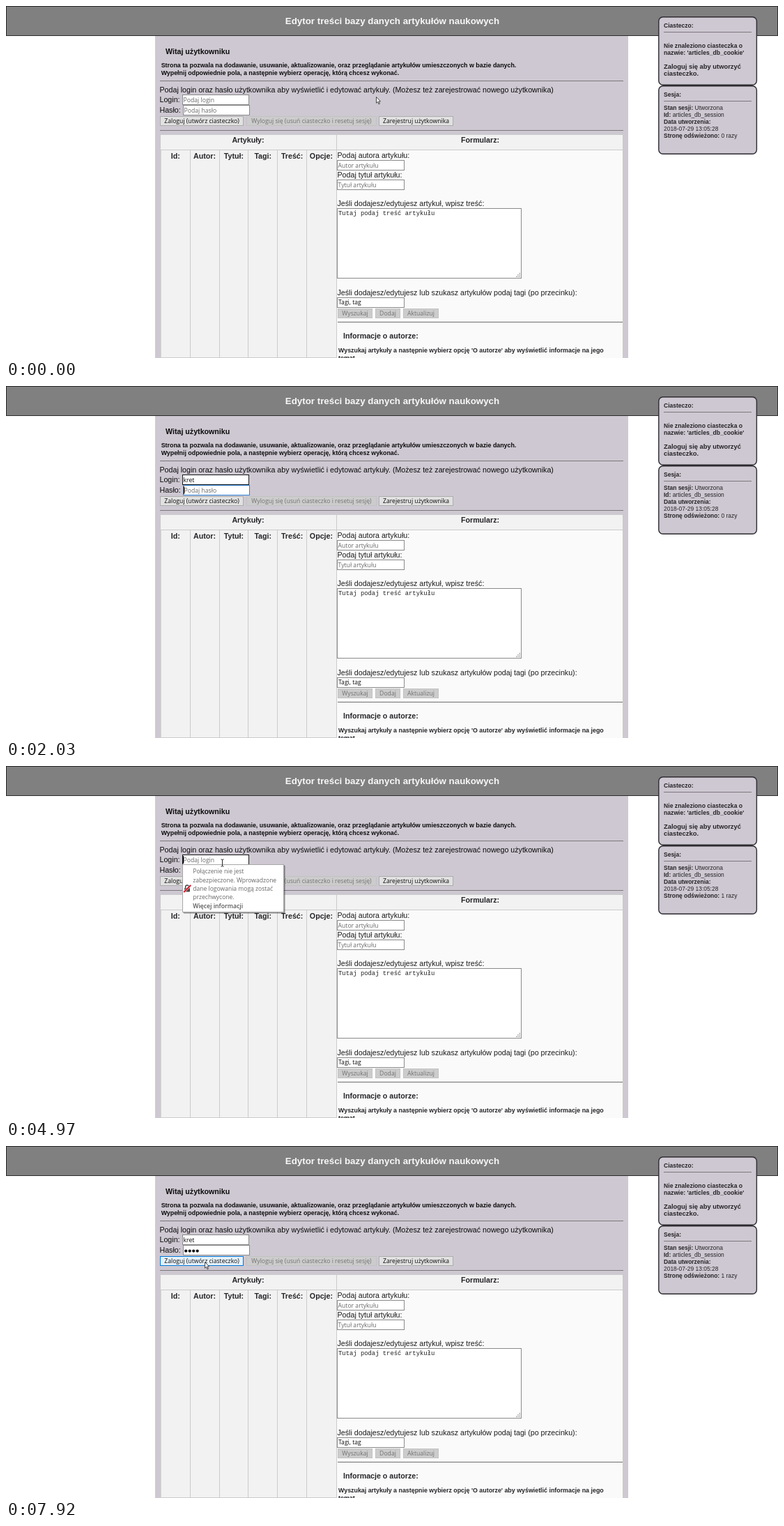
Animation of 1108x505 px, one loop 8 s. Source, as an HTML page:

```html
<!DOCTYPE html>
<html lang="pl">
<head>
<meta charset="utf-8">
<title>Edytor treści</title>
<style>
html, body { margin: 0; width: 100%; height: 100%; overflow: hidden; background: #fff; }
svg { display: block; width: 1108px; height: 505px; }
text { font-family: "Liberation Sans", Arial, sans-serif; white-space: pre; }
.ui { font-family: "Open Sans", "Noto Sans", sans-serif; font-size: 8.65px; }
.mono { font-family: "Liberation Mono", monospace; font-size: 8.87px; }
.b { font-weight: 700; }
</style>
</head>
<body>
<svg id="stage" viewBox="0 0 1108 505"></svg>
<script>
const stage = document.getElementById('stage');
const LILAC = '#cec8d2', INK = '#0c0c0c', SOFT = '#262428', HINT = '#676767', EDGE = '#8a8a8a';
const LOOP = 8000, WORD = 'kret';

function add(tag, attrs, parent = stage) {
  const el = document.createElementNS('http://www.w3.org/2000/svg', tag);
  set(el, attrs);
  parent.appendChild(el);
  return el;
}
function set(el, attrs) {
  for (const k in attrs) el.setAttribute(k, attrs[k]);
}
const show = (el, on) => set(el, { visibility: on ? 'visible' : 'hidden' });

// Filled box with a one-pixel border inside its edges
function box(x, y, w, h, fill, stroke, parent) {
  return add('rect', { x: x + .5, y: y + .5, width: w - 1, height: h - 1, fill, stroke: stroke || fill }, parent);
}
function line(x1, y1, x2, y2, stroke) {
  add('path', { d: `M${x1} ${y1}L${x2} ${y2}`, stroke });
}
function text(str, x, y, opt = {}, parent) {
  const { size = 10.67, fill = INK, cls = '', anchor = 'start' } = opt;
  const el = add('text', { x, y, fill, class: cls, 'text-anchor': anchor, 'font-size': size }, parent);
  el.textContent = str;
  return el;
}
const bold = (str, x, y, size = 10.67, fill = INK, anchor) => text(str, x, y, { size, fill, cls: 'b', anchor });
const ui = (str, x, y, fill = INK, parent) => text(str, x, y, { fill, cls: 'ui' }, parent);

function button(label, x, y, w, h, on) {
  const face = on ? box(x, y, w, h, '#e1e1e1', '#adadad') : box(x, y, w, h, '#cccccc', '#c3c3c3');
  text(label, x + w / 2, y + h / 2 + 3.2, { cls: 'ui', anchor: 'middle', fill: on ? INK : '#727272' });
  return face;
}
function field(x, y, w, h, hint) {
  const frame = box(x, y, w, h, '#fff', EDGE);
  return { frame, hint: ui(hint, x + 1.6, y + h / 2 + 3.1, HINT) };
}

// Page frame
box(0, 0, 1108, 43, '#808080', '#2a2a2a');
bold('Edytor treści bazy danych artykułów naukowych', 554.5, 26, 13.33, '#f7f7f7', 'middle');
add('rect', { x: 214, y: 43, width: 679, height: 462, fill: LILAC });
bold('Witaj użytkowniku', 229, 69);
bold('Strona ta pozwala na dodawanie, usuwanie, aktualizowanie, oraz przeglądanie artykułów umieszczonych w bazie danych.', 222.7, 88, 8.85);
bold('Wypełnij odpowiednie pola, a następnie wybierz operację, którą chcesz wykonać.', 222.7, 99, 8.85);
line(221, 107.5, 886, 107.5, '#7b787d');
text('Podaj login oraz hasło użytkownika aby wyświetlić i edytować artykuły. (Możesz też zarejestrować nowego użytkownika)', 220.5, 124);
text('Login:', 220.5, 138);
text('Hasło:', 220.5, 153);

// Table
line(221, 178.5, 886, 178.5, '#7b787d');
box(221, 184, 254, 321, '#f2f2f2', '#cbcbcb');
box(474, 184, 412, 23, '#f2f2f2', '#cbcbcb');
box(474, 206, 412, 300, '#fafafa', '#cbcbcb');
line(221, 206.5, 475, 206.5, '#cbcbcb');
bold('Artykuły:', 347.5, 196, 10.67, SOFT, 'middle');
bold('Formularz:', 680.5, 196, 10.67, SOFT, 'middle');
['Id:', 'Autor:', 'Tytuł:', 'Tagi:', 'Treść:', 'Opcje:'].forEach((name, i) => {
  bold(name, 243.2 + i * 41.85, 219, 10.67, SOFT, 'middle');
  const x = Math.round(264 + i * 41.7) + .5;
  if (i < 5) line(x, 207, x, 505, '#cbcbcb');
});
line(222.5, 207, 222.5, 505, '#d6d6d6');

// Form
const label = (str, y) => text(str, 475.5, y, { fill: '#1c1c1c' });
label('Podaj autora artykułu:', 218);
field(475, 221, 97, 15, 'Autor artykułu');
label('Podaj tytuł artykułu:', 246);
field(475, 249, 97, 15, 'Tytuł artykułu');
label('Jeśli dodajesz/edytujesz artykuł, wpisz treść:', 287);
box(475, 290, 265, 101, '#fff', EDGE);
text('Tutaj podaj treść artykułu', 477, 300, { cls: 'mono', size: 8.87, fill: '#222' });
for (let r = 0; r < 3; r++)
  for (let c = 2 - r; c < 3; c++)
    add('rect', { x: 732 + c * 2.3, y: 383 + r * 2.3, width: 1.2, height: 1.2, fill: '#777' });
label('Jeśli dodajesz/edytujesz lub szukasz artykułów podaj tagi (po przecinku):', 415);
field(475, 418, 97, 15, '');
ui('Tagi, tag', 477, 428.3);
button('Wyszukaj', 476, 434, 50, 14);
button('Dodaj', 530, 434, 36, 14);
button('Aktualizuj', 570, 434, 51, 14);
line(476, 453.5, 885, 453.5, '#6e6e6e');
bold('Informacje o autorze:', 484, 477, 10.67, SOFT);
bold("Wyszukaj artykuły a następnie wybierz opcję 'O autorze' aby wyświetlić informacje na jego", 477, 497, 8.87, SOFT);
bold('temat.', 477, 507.5, 8.87, SOFT);

// Side panels
for (const y of [15.7, 114.7]) {
  add('rect', { x: 936.8, y, width: 140.6, height: 97.6, rx: 6, fill: LILAC, stroke: '#2e2b30', 'stroke-width': 1.4 });
  line(944, Math.floor(y + 22) + .5, 1070, Math.floor(y + 22) + .5, '#7b787d');
}
const side = (str, y, size) => bold(str, 944, y, size, SOFT);
side('Ciasteczo:', 31, 8.5);
side('Nie znaleziono ciasteczka o', 60, 8.63);
side("nazwie: 'articles_db_cookie'", 70, 8.63);
side('Zaloguj się aby utworzyć', 90, 9.4);
side('ciasteczko.', 100, 9.4);
side('Sesja:', 130, 8.5);
function pair(name, value, y) {
  const el = text('', 944, y, { size: 8.45, fill: SOFT });
  add('tspan', { class: 'b' }, el).textContent = name;
  const val = add('tspan', {}, el);
  val.textContent = ' ' + value;
  return val;
}
pair('Stan sesji:', 'Utworzona', 149);
pair('Id:', 'articles_db_session', 159);
pair('Data utworzenia:', '', 169);
text('2018-07-29 13:05:28', 944, 179, { size: 8.45, fill: SOFT });
const visits = pair('Stronę odświeżono:', '0 razy', 189);

// Login area
const login = field(253, 127, 96, 15, 'Podaj login');
const pass = field(254, 142, 96, 15, 'Podaj hasło');
const typed = ui('', 254.5, 137.6);
const dots = [0, 1, 2, 3].map(i => add('circle', { cx: 258.2 + i * 5.5, cy: 150.6, r: 2.1, fill: INK }));
const enter = button('Zaloguj (utwórz ciasteczko)', 221, 158, 120, 14, true);
button('Wyloguj się (usuń ciasteczko i resetuj sesję)', 345, 158, 187, 14);
const register = button('Zarejestruj użytkownika', 535, 158, 107, 14, true);
const caret = add('rect', { width: 1, height: 11, fill: '#000' });

// Warning popup
const popup = add('g', {});
for (const d of [2, 1])
  add('rect', { x: 253 + d, y: 141 + d, width: 146, height: 69, fill: '#000', opacity: .22 }, popup);
box(253, 141, 146, 69, '#fff', '#a8a8a8', popup);
['Połączenie nie jest', 'zabezpieczone. Wprowadzone', 'dane logowania mogą zostać', 'przechwycone.'].forEach((row, i) =>
  set(ui(row, 268.3, 154.3 + i * 12.3, '#686868', popup), { style: 'font-size: 8.55px' }));
set(ui('Więcej informacji', 268.3, 203.6, '#565656', popup), { 'font-weight': 600 });
add('path', { d: 'M257.6 175v-1.6a2.4 2.4 0 0 1 4.8 0v1.6', fill: 'none', stroke: '#4a4a4a', 'stroke-width': 1.5 }, popup);
add('rect', { x: 256, y: 175, width: 8, height: 5.6, rx: .8, fill: '#4a4a4a' }, popup);
add('path', { d: 'M255.2 181L265.2 171', stroke: '#fff', 'stroke-width': 3 }, popup);
add('path', { d: 'M255.2 181L265.2 171', stroke: '#d7182a', 'stroke-width': 2 }, popup);

// Pointer shapes
const arrow = add('path', { d: 'M.5 .5V9.2L2.5 7.4L4 10.8L5.4 10.2L3.9 6.9H6.5Z', fill: '#fff', stroke: '#222', 'stroke-width': .8 });
const beam = add('path', { d: 'M-2 -5H-.5L0 -4.5L.5 -5H2M0 -4.5V4.5M-2 5H-.5L0 4.5L.5 5H2', fill: 'none', stroke: '#111', 'stroke-width': .9 });

// Pointer travel: start, end, steps, target, optional bend point
const moves = [
  { t0: 70, t1: 620, n: 8, to: [321, 138], bend: [430, 96] },
  { t0: 3040, t1: 3190, n: 3, to: [366, 138] },
  { t0: 3270, t1: 3350, n: 2, to: [512, 150] },
  { t0: 3580, t1: 3820, n: 4, to: [549, 167] },
  { t0: 4440, t1: 4820, n: 6, to: [310, 139] },
  { t0: 5050, t1: 5050, n: 1, to: [307, 135] },
  { t0: 7070, t1: 7070, n: 1, to: [316, 135] },
  { t0: 7150, t1: 7610, n: 7, to: [284, 165] },
  { t0: 7920, t1: 7920, n: 1, to: [285, 166] }
];
function pointerAt(t) {
  let pos = [531, 130];
  for (const { t0, t1, n, to, bend } of moves) {
    if (t < t0) break;
    const step = n > 1 ? Math.min(n, 1 + Math.floor((t - t0) / (t1 - t0) * (n - 1))) : 1;
    const s = step / n;
    pos = pos.map((from, i) => {
      const mid = bend ? bend[i] : (from + to[i]) / 2;
      return (1 - s) ** 2 * from + 2 * s * (1 - s) * mid + s * s * to[i];
    });
  }
  return pos;
}

const within = (t, ...spans) => spans.some(([a, b]) => t >= a && t < b);
const count = (t, times) => times.filter(x => t >= x).length;

function draw(t) {
  const second = t >= 4210;
  const letters = count(t, second ? [5200, 5280, 5430, 5600] : [1030, 1180, 1340, 1490]);
  const marks = count(t, second ? [6690, 6770, 6840, 7070] : [2580, 2730, 2810, 3040]);
  typed.textContent = WORD.slice(0, letters);
  show(login.hint, !letters);
  show(pass.hint, !marks);
  dots.forEach((dot, i) => show(dot, i < marks));
  visits.textContent = second ? ' 1 razy' : ' 0 razy';

  const inPass = within(t, [2030, 3660], [6210, 7380]);
  set(login.frame, { stroke: within(t, [620, 3270], [4740, 7220]) ? '#171717' : EDGE });
  set(pass.frame, { stroke: inPass ? '#2f84d6' : EDGE });

  show(caret, within(t, [780, 1800], [2030, 3120], [4820, 6060], [6210, 7300]));
  const caretX = inPass ? 255 + marks * 5.55 : 254 + (letters ? typed.getComputedTextLength() + .3 : 0);
  set(caret, { x: Math.round(caretX), y: inPass ? 144 : 129 });

  const low = within(t, [2110, 3660], [6300, 7380]);
  const high = within(t, [780, 2030], [4820, 6210]);
  show(popup, low || high);
  set(popup, {
    transform: low ? 'translate(1 15)' : '',
    opacity: within(t, [780, 860], [2110, 2180], [4820, 4900]) ? .6 : 1
  });

  const pressed = within(t, [3900, 3980]);
  const lit = (el, on) => set(el, {
    fill: !on ? '#e1e1e1' : pressed ? '#cce4f7' : '#e5f1fb',
    stroke: !on ? '#adadad' : pressed ? '#005499' : '#0078d7'
  });
  lit(register, within(t, [3740, 4440]));
  lit(enter, t >= 7460);

  const [x, y] = pointerAt(t);
  const hidden = within(t, [1410, 3040], [5980, 7070]);
  const overLogin = x > 252 && x < 349 && y > 127 && y < 142;
  show(arrow, !hidden && !overLogin);
  show(beam, !hidden && overLogin);
  set(arrow, { transform: `translate(${Math.round(x)} ${Math.round(y)})` });
  set(beam, { transform: `translate(${Math.round(x) + .5} ${Math.round(y)})` });
}

const start = performance.now();
function tick() {
  draw((performance.now() - start) % LOOP);
  requestAnimationFrame(tick);
}
tick();
</script>
</body>
</html>
```
